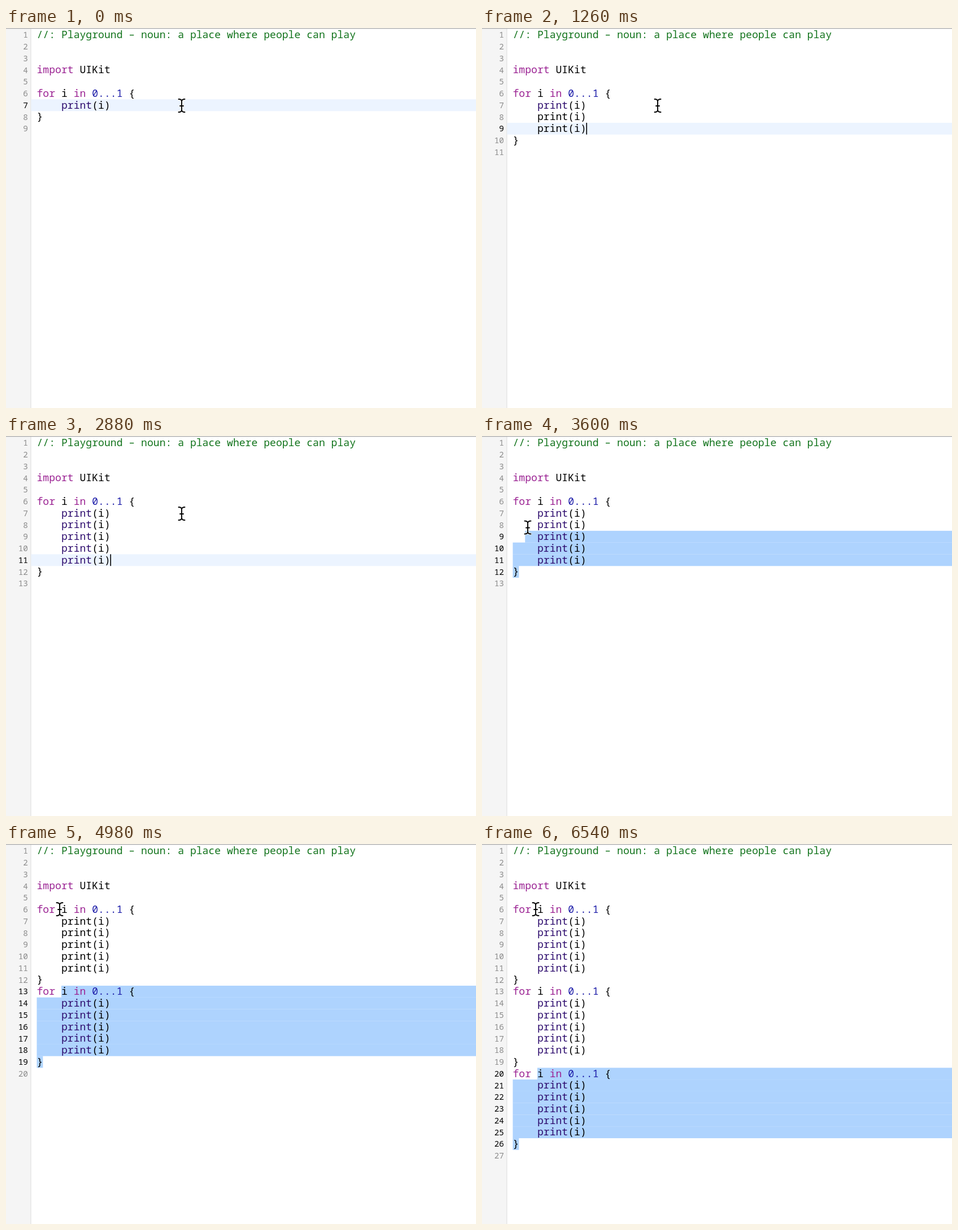
Recreate the animation shown at these times as an HTML page. Size 832 by 673 pixels, loop 6.6 s.

```html
<!DOCTYPE html>
<html lang="en">
<head>
<meta charset="utf-8">
<title>Duplicating lines in an editor</title>
<style>
  html, body { margin: 0; width: 100%; height: 100%; overflow: hidden; background: #fff; }
  svg { display: block; }
  text { white-space: pre; font-family: "Noto Sans Mono", "DejaVu Sans Mono", monospace; }
  .code { font-size: 18.1px; fill: #000; }
  .comment { fill: #11731b; }
  .keyword { fill: #9b2393; }
  .number { fill: #1c1ca8; }
  .call { fill: #2e0d6e; }
  .line-no { font-size: 14.4px; font-weight: 500; fill: #8c8c8c; text-anchor: end; }
  .line-no.active { fill: #000; }
  .current { fill: #ecf4ff; }
  .selected { fill: #aed3fe; }
  #pointer path { fill: none; stroke-linecap: round; stroke-linejoin: round; }
</style>
</head>
<body>
<svg width="832" height="673" viewBox="0 0 832 673">
  <rect width="832" height="673" fill="#fff"/>
  <rect width="44" height="673" fill="#f5f5f5"/>
  <rect x="43.5" width="1" height="673" fill="#dcdcdc"/>
  <rect width="832" height="1.4" fill="#b0b0b0"/>
  <g id="marks"></g>
  <g id="lines"></g>
  <g id="pointer">
    <path stroke="#fff" stroke-width="3.6" d="M-5.5-11.5Q0-11.5 0-7.5Q0-11.5 5.5-11.5M0-8V8M-5.5 11.5Q0 11.5 0 7.5Q0 11.5 5.5 11.5M-3 .5H3"/>
    <path stroke="#000" stroke-width="1.9" d="M-5.5-11.5Q0-11.5 0-7.5Q0-11.5 5.5-11.5M0-8V8M-5.5 11.5Q0 11.5 0 7.5Q0 11.5 5.5 11.5M-3 .5H3"/>
  </g>
</svg>
<script>
const LOOP = 6600, STEP = 60;
const LEFT = 54.5, COL = 10.86, TOP = 1.7, ROW = 20.77, WIDTH = 832;
const FIRST = 6;                            // line of the first loop statement
const LINE_COPIES = [840, 1140, 1560, 2220];
const BLOCK_COPIES = [4800, 6000];
const INDEXED = [2040, 2760, 5400, 6540];   // moments when new code gets its colours
const CARET_ON = 300, CLICK = 3300;
const PATH = [[2940, 311, 137.5], [3240, 66, 241], [3360, 66, 241], [3600, 81, 162], [3840, 95, 115.5]];

const [marks, lines, pointer] = ['marks', 'lines', 'pointer'].map(id => document.getElementById(id));
const span = (kind, text) => `<tspan class="${kind}">${text}</tspan>`;
const rowTop = n => TOP + ROW * (n - 1);
const colX = c => LEFT + COL * c;
const past = (times, t) => times.filter(at => at <= t).length;

function pointerAt(t) {
  let [, x, y] = PATH[0];
  for (let i = 1; i < PATH.length; i++) {
    const [t0, x0, y0] = PATH[i - 1], [t1, x1, y1] = PATH[i];
    if (t < t0) break;
    const p = Math.min(1, (t - t0) / (t1 - t0)), e = p * p * (3 - 2 * p);
    x = x0 + (x1 - x0) * e;
    y = y0 + (y1 - y0) * e;
  }
  return [x, y];
}

// Code copied at the given time stays plain until the next indexing pass.
const isPlain = (copied, t) => copied <= t && t < INDEXED.find(at => at > copied);

function sourceLines(t) {
  const out = [
    span('comment', '//: Playground – noun: a place where people can play'),
    '', '', span('keyword', 'import') + ' UIKit', ''
  ];
  const prints = 1 + past(LINE_COPIES, t), copies = past(BLOCK_COPIES, t);
  for (let block = 0; block <= copies; block++) {
    out.push(`${span('keyword', 'for')} i ${span('keyword', 'in')} ${span('number', '0...1')} {`);
    for (let i = 0; i < prints; i++) {
      const plain = block < copies && isPlain(BLOCK_COPIES[block], t) ||
        i > 0 && isPlain(LINE_COPIES[i - 1], t);
      out.push(`    ${span(plain ? 'plain' : 'call', 'print')}(i)`);
    }
    out.push('}');
  }
  return out.concat('');
}

// Start and end of the selection; equal points mean a bare caret.
function selectionAt(t) {
  if (t < CLICK) {
    const line = FIRST + 1 + past(LINE_COPIES, t);
    return { from: line, to: line, start: 12, end: 12 };
  }
  const [x, y] = pointerAt(t - STEP), shift = 7 * past(BLOCK_COPIES, t);
  const line = Math.floor((y - TOP) / ROW) + 1;
  return { from: line + shift, to: 12 + shift, start: Math.round((x - LEFT) / COL), end: 1 };
}

const bar = (kind, line, x0, x1) =>
  `<rect class="${kind}" x="${x0}" y="${rowTop(line)}" width="${x1 - x0}" height="${ROW + .1}"/>`;

function drawMarks({ from, to, start, end }, t) {
  if (from === to && start === end) {
    const caret = t >= CARET_ON
      ? `<rect x="${colX(start) - .4}" y="${rowTop(from)}" width="1.6" height="${ROW}"/>` : '';
    return bar('current', from, 44.5, WIDTH) + caret;
  }
  let out = '';
  for (let n = from; n <= to; n++) {
    out += bar('selected', n, n === from ? colX(start) : LEFT, n === to ? colX(end) : WIDTH);
  }
  return out;
}

function render(t) {
  const sel = selectionAt(t);
  marks.innerHTML = drawMarks(sel, t);
  lines.innerHTML = sourceLines(t).map((code, i) => {
    const n = i + 1, y = 18 + ROW * i;
    const active = n >= sel.from && n <= sel.to ? ' active' : '';
    return `<text class="line-no${active}" x="39" y="${y - .8}">${n}</text>` +
      `<text class="code" x="${LEFT}" y="${y}">${code}</text>`;
  }).join('');
  pointer.setAttribute('transform', `translate(${pointerAt(t)})`);
}

let shown = -1;
function tick() {
  const step = Math.floor(performance.now() % LOOP / STEP);
  if (step !== shown) render((shown = step) * STEP);
  requestAnimationFrame(tick);
}
tick();
</script>
</body>
</html>
```
